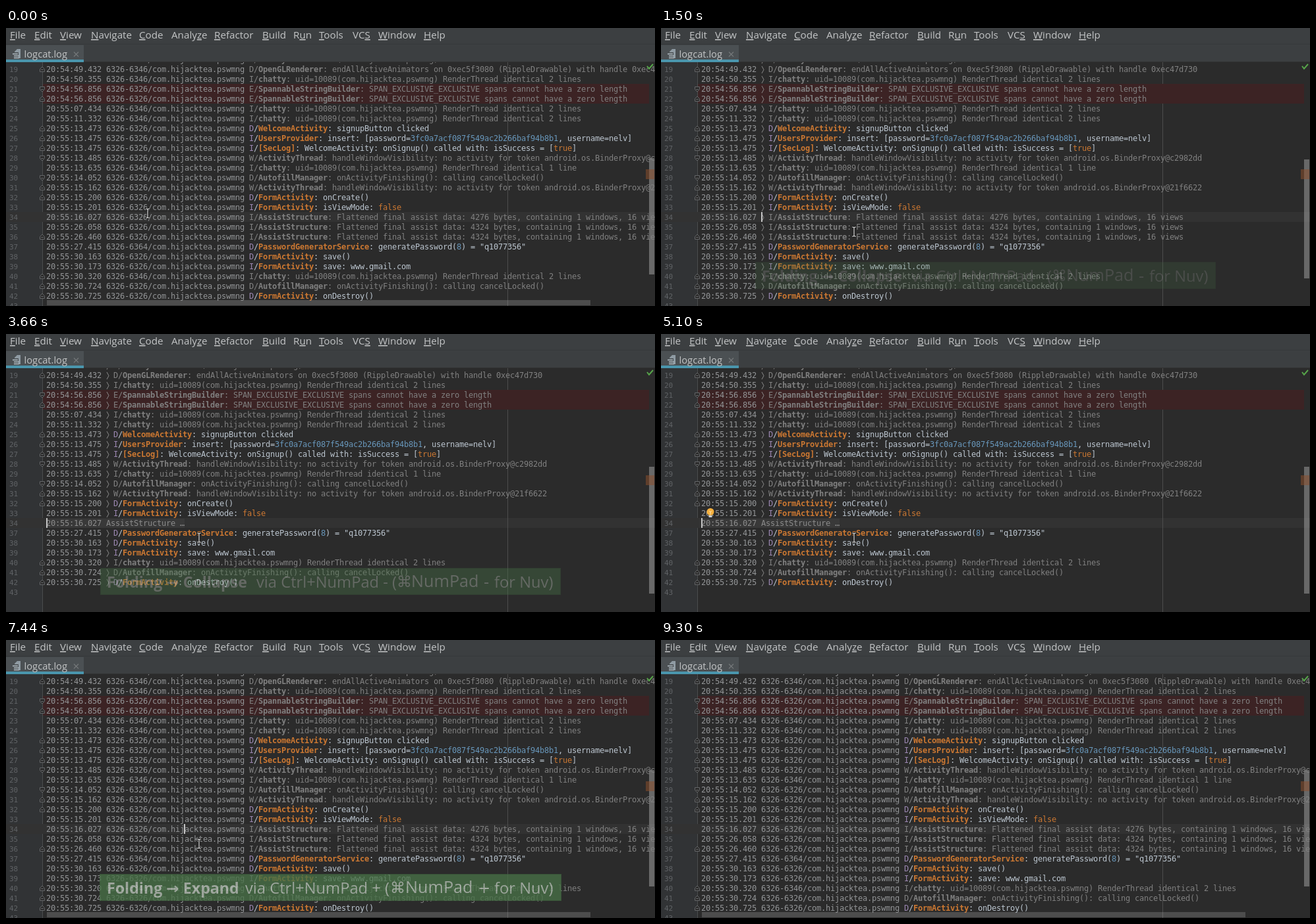
Animation, 985 px wide and 423 px high, one loop 9360 ms. Source, as an HTML page:

```html
<!DOCTYPE html>
<html lang="en">
<head>
<meta charset="utf-8">
<title>Log folding</title>
<style>
  html, body { margin: 0; width: 100%; height: 100%; overflow: hidden; background: #2b2b2b; }
  #stage { position: relative; width: 985px; height: 423px; overflow: hidden; background: #2b2b2b; }
  #stage div, #stage svg { position: absolute; }
  svg { left: 0; top: 0; }
  #gutter { left: 0; top: 52px; width: 55px; height: 371px; background: #313335; border-right: 1px solid #4b4d4e; }
  #current { left: 0; top: 280px; width: 985px; height: 15px; background: #323232; }
  #margin { left: 761px; top: 52px; width: 1px; height: 371px; background: #4d4d4d; }
  .view { inset: 0; }
  .row { left: 0; width: 985px; height: 15px; white-space: pre;
         font: 12px/15px "DejaVu Sans Mono", monospace; letter-spacing: calc(7px - 1ch); color: #808080; }
  .row .num { left: 5px; top: 1px; font-size: 11px; letter-spacing: 0; color: #606366; }
  .row .line { left: 61px; top: 1px; color: #939597; }
  .row .back { left: 56px; width: 920px; height: 15px; background: #3c2324; }
  .dim { color: #808080; }
  .app { color: #bcc6d0; }
  .app b { color: #cc7832; }
  .app i { color: #9a86b0; }
  .row i { font-style: normal; }
  .word { color: #cc7832; }
  .number { color: #6897bb; }
  .fold { display: inline-block; width: 4px; height: 11px; vertical-align: -2px; }
  #stage .fold svg { position: static; overflow: visible; display: block; }
  .group { color: #8c8c8c; background: #393939; }
  .bar { background: rgba(166, 166, 166, .5); }
  .bar.wide { background: rgba(166, 166, 166, .28); }
  #menu { left: 0; top: 0; width: 985px; height: 51px; background: #3c3f41; border-bottom: 1px solid #323232; }
  #menu text { font: 15.2px "Open Sans", "Noto Sans", sans-serif; fill: #c3c5c6; }
  #menu tspan { text-decoration: underline; }
  #menu .tab { font-size: 14.7px; }
  .banner text { font: 23.7px "Open Sans", "Noto Sans", sans-serif; fill: #bcc7bb; }
  .banner .strong { font-size: 23.2px; font-weight: 700; }
  .banner .strong tspan { font-family: "DejaVu Sans", sans-serif; }
  .banner .key { font-size: 25.2px; }
  .banner .sign { font: 23px "DejaVu Sans", sans-serif; }
  #caret { top: 280px; width: 2px; height: 15px; background: #c4c4c4; }
</style>
</head>
<body>
<div id="stage">
  <div id="gutter"></div>
  <div id="current"></div>
  <div id="margin"></div>
  <div id="views"></div>
  <svg width="985" height="423">
    <rect x="971" y="215" width="13" height="15" fill="#8a4f2c" opacity=".55"/>
    <path d="M973 58l3 4 6-7" fill="none" stroke="#57a64a" stroke-width="2"/>
    <g id="bulb">
      <circle cx="75" cy="270.500" r="5.500" fill="#f4af3d"/>
      <path d="M72.500 276h5v3h-5z" fill="#c9ccce"/>
      <path d="M73 269l2 2 2-2M75 271v4" fill="none" stroke="#fbe3ae"/>
    </g>
  </svg>
  <div id="caret"></div>
  <div id="menu">
    <svg width="985" height="52">
      <path d="M0 24.500H985" stroke="#36393b"/>
      <path d="M0 26H118V52H0z" fill="#4b5053"/>
      <path d="M0 48H118V52H0z" fill="#4a96ad"/>
      <path d="M17 32h5v14h-9V36z" fill="#8f9ba3"/>
      <path d="M10 37h9v10h-9z" fill="#4b5053"/>
      <path d="M10 39.500h8M12 42.500h8M12 45.500h8" stroke="#b4bfc6" stroke-width="1.500"/>
      <path d="M103 36.500l7 7m0-7l-7 7" stroke="#74787a" stroke-width="1.200"/>
      <text x="27.500" y="45" class="tab">logcat.log</text>
      <g id="items"></g>
    </svg>
  </div>
  <svg class="banner" id="collapse" width="985" height="423">
    <rect x="143.500" y="356.500" width="698" height="40" fill="#487147" stroke="#3d613d"/>
    <text x="153" y="386" class="strong">Folding <tspan>→</tspan> Collapse</text>
    <text x="380" y="386">via Ctrl+NumPad - (</text>
    <text x="593" y="385" class="sign">⌘</text>
    <text x="615" y="385" class="key">NumPad</text>
    <text x="725" y="385" class="sign">-</text>
    <text x="741" y="386">for Nuv)</text>
  </svg>
  <svg class="banner" id="expand" width="985" height="423">
    <rect x="142.500" y="356.500" width="700" height="40" fill="#487147" stroke="#3d613d"/>
    <text x="153" y="386" class="strong">Folding <tspan>→</tspan> Expand</text>
    <text x="363" y="386">via Ctrl+NumPad + (</text>
    <text x="583" y="385" class="sign">⌘</text>
    <text x="606" y="385" class="key">NumPad</text>
    <text x="716" y="385" class="sign">+</text>
    <text x="741" y="386">for Nuv)</text>
  </svg>
  <svg id="mouse" width="12" height="18" viewBox="-6 -9 12 18">
    <g fill="none">
      <path d="M-3-7h2l1 1 1-1h2M0-6V6M-3 7h2l1-1 1 1h2" stroke="#111" stroke-width="3"/>
      <path d="M-3-7h2l1 1 1-1h2M0-6V6M-3 7h2l1-1 1 1h2" stroke="#e6e6e6" stroke-width="1.200"/>
    </g>
  </svg>
</div>
<script>
const LOOP = 9360, STEP = 60, ROW = 15, FIRST = 18;
const $ = id => document.getElementById(id);
const PACKAGE = 'com.hijacktea.pswmng';
const chatty = count => `I/chatty: uid=10089(${PACKAGE}) RenderThread identical ${count}`;
const span = 'E/SpannableStringBuilder: SPAN_EXCLUSIVE_EXCLUSIVE spans cannot have a zero length';
const token = id => `W/ActivityThread: handleWindowVisibility: no activity for token android.os.BinderProxy@${id}`;
const assist = size => `I/AssistStructure: Flattened final assist data: ${size} bytes, containing 1 windows, 16 views`;
const cancel = 'D/AutofillManager: onActivityFinishing(): calling cancelLocked()';

// time, thread, message
const log = [
  ['54:49.398', 6346, chatty('2 lines')],
  ['54:49.432', 6346, 'D/OpenGLRenderer: endAllActiveAnimators on 0xec5f3080 (RippleDrawable) with handle 0xec47d730'],
  ['54:50.355', 6346, chatty('2 lines')],
  ['54:56.856', 6326, span],
  ['54:56.856', 6326, span],
  ['55:07.434', 6346, chatty('2 lines')],
  ['55:11.332', 6346, chatty('2 lines')],
  ['55:13.473', 6326, 'D/WelcomeActivity: signupButton clicked'],
  ['55:13.475', 6326, 'I/UsersProvider: insert: [password=3fc0a7acf087f549ac2b266baf94b8b1, username=nelv]'],
  ['55:13.475', 6326, 'I/[SecLog]: WelcomeActivity: onSignup() called with: isSuccess = [true]'],
  ['55:13.485', 6326, token('c2982dd')],
  ['55:13.635', 6346, chatty('1 line')],
  ['55:14.052', 6326, cancel],
  ['55:15.162', 6326, token('21f6622')],
  ['55:15.200', 6326, 'D/FormActivity: onCreate()'],
  ['55:15.201', 6326, 'I/FormActivity: isViewMode: false'],
  ['55:16.027', 6326, assist(4276)],
  ['55:26.058', 6326, assist(4324)],
  ['55:26.460', 6326, assist(4324)],
  ['55:27.415', 6364, 'D/PasswordGeneratorService: generatePassword(8) = "q1077356"'],
  ['55:30.163', 6326, 'D/FormActivity: save()'],
  ['55:30.173', 6326, 'I/FormActivity: save: www.gmail.com'],
  ['55:30.320', 6346, chatty('2 lines')],
  ['55:30.724', 6326, cancel],
  ['55:30.725', 6326, 'D/FormActivity: onDestroy()']
];
const opens = [21, 28, 30];
const closes = [19, 22, 25, 26, 27, 31, 32, 36, 40, 41, 42];
const appTag = /Welcome|Users|SecLog|Form|Password/;
const chevron = '<span class="fold"><svg width="4" height="11"><path d="M1 0l3 5.500-3 5.500" fill="none" stroke="#8a8a8a"/></svg></span>';

function message(text) {
  const [, level, tag, body] = text.match(/^(\w)\/(.+?)(: .*)$/);
  const colored = body
    .replace(/\b[0-9a-f]{32}\b|(?<=Password\()8/, '<span class="number">$&</span>')
    .replace(/\b(true|false)\b/, '<span class="word">$&</span>');
  return `<span class="${appTag.test(tag) ? 'app' : 'dim'}"><i>${level}</i>/<b>${tag}</b>${colored}</span>`;
}

function marker(number) {
  if (!opens.includes(number) && !closes.includes(number)) return '';
  const shape = opens.includes(number) ? 'M51.500 4.500h7v4l-3.500 3.500-3.500-3.500z' : 'M51.500 11.500h7v-4l-3.500-3.500-3.500 3.500z';
  return `<svg width="62" height="15"><path d="${shape}M53 8.500h4" fill="#2b2b2b" stroke="#646668"/></svg>`;
}

function buildView(folded, grouped, scrollTop, scrollEnd) {
  const view = document.createElement('div');
  view.className = 'view';
  let top = 55 - ROW;
  let html = `<div class="bar" style="left:976px;width:8px;top:${scrollTop}px;height:${scrollEnd - scrollTop}px"></div>`;
  const addRow = (number, line, back = '') => {
    html += `<div class="row" style="top:${top}px">${back}<div class="num">${number}</div>${marker(number)}<div class="line">${line}</div></div>`;
    top += ROW;
  };
  log.forEach(([time, thread, text], i) => {
    const number = FIRST + i;
    if (grouped && (number === 35 || number === 36)) return;
    const process = folded ? chevron : `6326-${thread}/${PACKAGE}`;
    const line = grouped && number === 34
      ? `<span class="group">20:${time} AssistStructure …</span>`
      : `20:${time} ${process} ${message(text)}`;
    addRow(number, line, text === span ? '<div class="back"></div>' : '');
  });
  addRow(43, '');
  if (!folded) html += '<div class="bar wide" style="left:62px;width:825px;top:414px;height:8px"></div>';
  view.innerHTML = html;
  $('views').append(view);
  return view;
}

const views = {
  full: buildView(false, false, 198, 375),
  folded: buildView(true, false, 200, 381),
  grouped: buildView(true, true, 202, 395)
};

// The letter after & is the underlined shortcut.
const menu = { '&File': 6, '&Edit': 43, '&View': 82, '&Navigate': 129, '&Code': 202, 'Analy&ze': 251, '&Refactor': 316,
  '&Build': 389, 'R&un': 436, '&Tools': 475, 'VC&S': 526, '&Window': 565, '&Help': 634 };
$('items').innerHTML = Object.entries(menu)
  .map(([name, x]) => `<text x="${x}" y="16">${name.replace(/&(.)/, '<tspan>$1</tspan>')}</text>`).join('');

// Stepped tracks: [start ms, value]
const viewTrack = [[0, 'full'], [1500, 'folded'], [3540, 'grouped'], [5520, 'folded'], [7260, 'full']];
const caretX = { full: 270, folded: 152, grouped: 61 };
const caretTrack = [[0, 0], [600, 1], [2820, 0], [3120, 1], [4380, 0], [5100, 1], [5820, 0], [6000, 1],
  [6240, 0], [6840, 1], [8100, 0], [8700, 1], [9300, 0]];
const bulbTrack = [[0, 0], [2820, 1], [3540, 0], [4080, 1], [5520, 0], [6000, 1], [7260, 0]];
const collapseTrack = [[0, 0], [1500, .22], [1560, .6], [1620, 1], [3540, .8], [3600, .6], [3660, .4], [3780, .2], [3900, 0]];
const expandTrack = [[0, 0], [5520, .22], [5580, .6], [5640, 1], [7440, .78], [8100, 0]];
const mousePath = [[0, 215, 282], [420, 270, 289], [540, 270, 289], [720, 293, 310], [8640, 293, 310], [8880, 345, 440], [LOOP, 345, 440]];

const at = (track, t) => track.findLast(key => key[0] <= t)[1];

function mouseAt(t) {
  const time = Math.floor(t / STEP) * STEP;
  const next = mousePath.findIndex(key => key[0] > time);
  const [t0, x0, y0] = mousePath[next - 1], [t1, x1, y1] = mousePath[next];
  const k = (time - t0) / (t1 - t0);
  return [x0 + (x1 - x0) * k, y0 + (y1 - y0) * k].map(Math.round);
}

const start = performance.now();
function draw() {
  const t = (performance.now() - start) % LOOP;
  const state = at(viewTrack, t);
  for (const name in views) views[name].style.visibility = name === state ? 'visible' : 'hidden';
  $('caret').style.left = caretX[state] + 'px';
  $('caret').style.opacity = at(caretTrack, t);
  $('bulb').style.opacity = at(bulbTrack, t);
  $('collapse').style.opacity = at(collapseTrack, t);
  $('expand').style.opacity = at(expandTrack, t);
  const [x, y] = mouseAt(t);
  $('mouse').style.transform = `translate(${x - 6}px, ${y - 9}px)`;
  requestAnimationFrame(draw);
}
draw();
</script>
</body>
</html>
```
